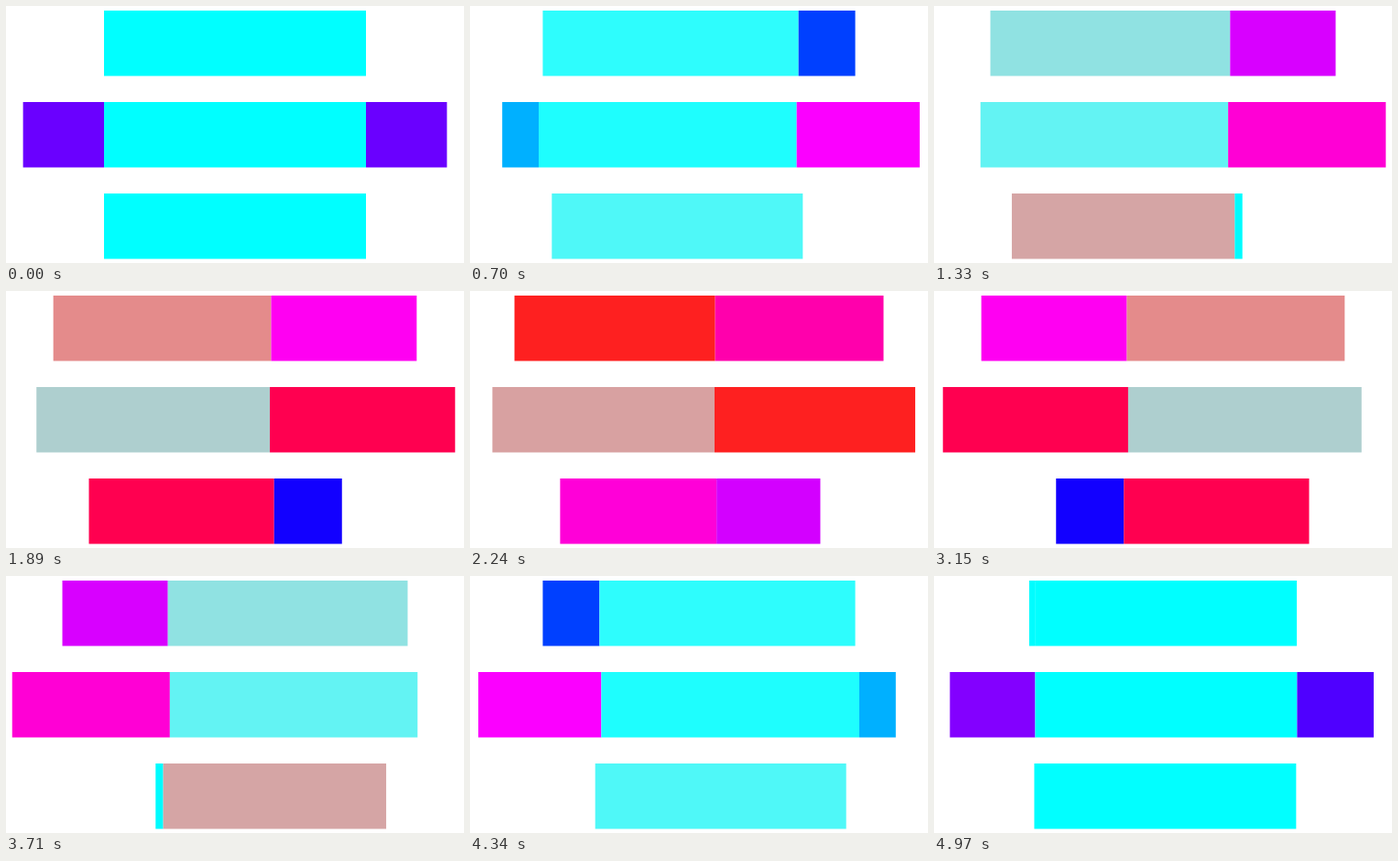
An HTML page with a canvas that plays this animation: 500 px wide and 281 px high, repeating every 5.04 s.

```html
<!DOCTYPE html>
<html lang="en">
<head>
<meta charset="utf-8">
<title>Turning prisms</title>
<style>
  html, body { margin: 0; width: 100%; height: 100%; overflow: hidden; background: #fff; }
  canvas { display: block; }
</style>
</head>
<body>
<canvas id="stage" width="500" height="281"></canvas>
<script>
const ctx = document.getElementById('stage').getContext('2d');
const STEP = 70, STEPS = 72;
const CENTER = 250, SIDE = 286, HEIGHT = SIDE / 4;
const PRISMS = [{ sides: 4, y: 5 }, { sides: 5, y: 105 }, { sides: 3, y: 205 }];

// Face colours from edge-on to facing the viewer: cyan, blue, magenta, red, cyan.
const RAMP = [[0, 1, 1], [0, 0, 1], [1, 0, 1], [1, 0, 0], [0, 1, 1]];

function faceColor(facing) {
  const pos = facing * (RAMP.length - 1);
  const i = Math.min(Math.floor(pos), RAMP.length - 2);
  const p = pos - i;
  const rgb = RAMP[i].map((from, k) => {
    const level = from * (1 - p * p) + RAMP[i + 1][k] * (1 - (1 - p) ** 2);
    return Math.round(255 * Math.min(1, level));
  });
  return `rgb(${rgb})`;
}

function drawPrism({ sides, y }, progress) {
  const half = Math.PI / sides;
  const radius = SIDE / (2 * Math.sin(half));
  const edge = angle => CENTER + radius * Math.sin(angle);
  for (let i = 0; i < sides; i++) {
    const normal = 2 * half * (i - progress);
    const facing = Math.cos(normal);
    if (facing < 1e-6) continue;
    const left = edge(normal - half);
    ctx.fillStyle = faceColor(facing);
    ctx.fillRect(left, y, edge(normal + half) - left, HEIGHT);
  }
}

function render(now) {
  const progress = (Math.floor(now / STEP) % STEPS) / STEPS;
  ctx.fillStyle = '#fff';
  ctx.fillRect(0, 0, 500, 281);
  PRISMS.forEach(prism => drawPrism(prism, progress));
}

function tick() {
  render(performance.now());
  requestAnimationFrame(tick);
}
tick();
</script>
</body>
</html>
```
